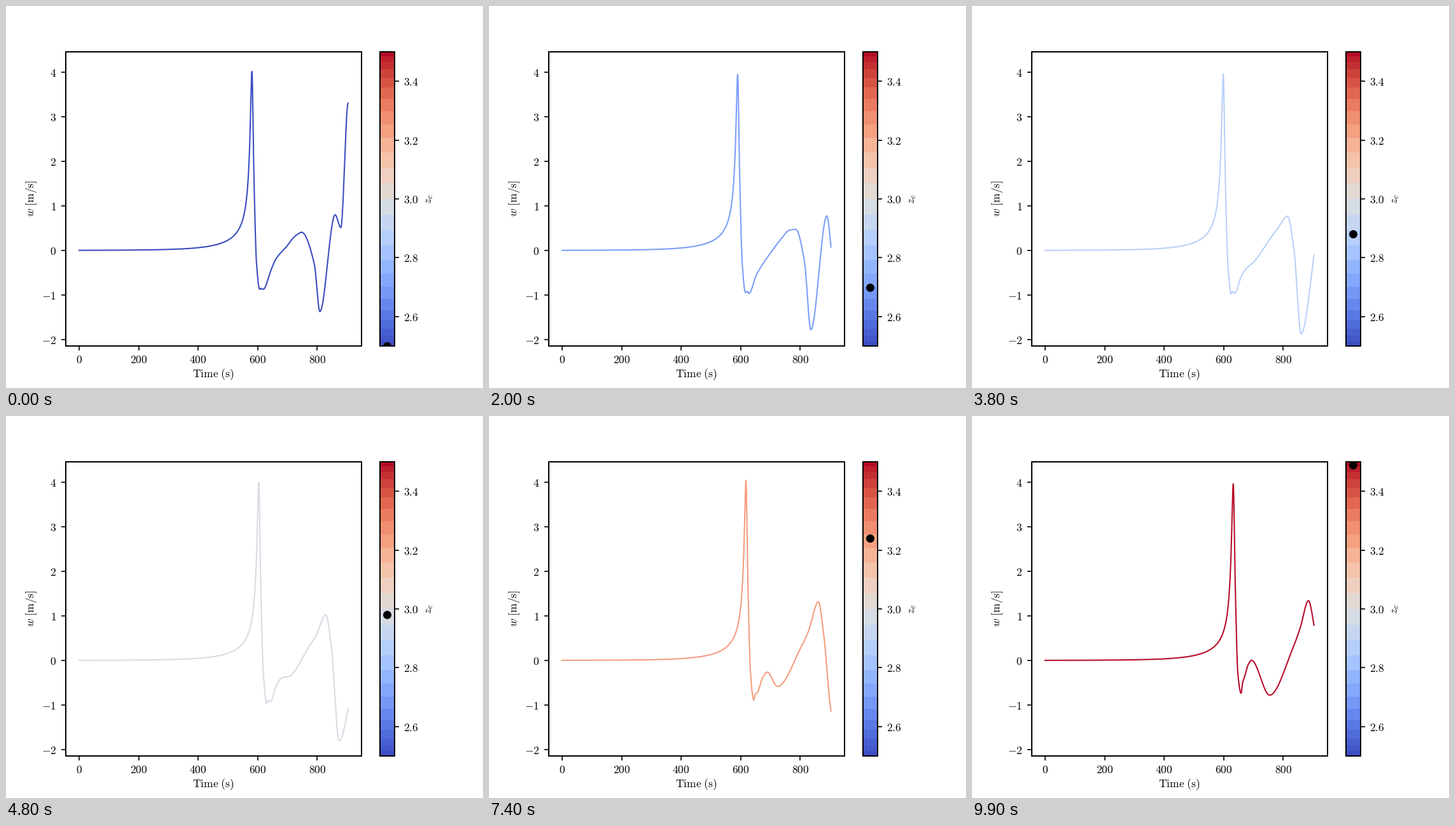
A matplotlib script for the animation above (10000 ms loop, 750 by 600 pixels).

```python
import numpy as np
import matplotlib.pyplot as plt
from matplotlib.animation import FuncAnimation

plt.rcParams["mathtext.fontset"] = "cm"
plt.rcParams["axes.linewidth"] = 0.96
SIZE = 8.4
N = 100
X0, SX = 114.886, 0.46825    # stage px of t = 0, px per second
Y0, SY = 384.0, 70.0         # stage px of w = 0, px per m/s
Z_LO, Z_HI = 2.5, 3.5


def pchip(x, y, q):
    """Shape-preserving cubic through (x, y) with level ends."""
    x, y = np.asarray(x, float), np.asarray(y, float)
    h = np.diff(x)
    s = np.diff(y) / h
    m = np.zeros_like(y)
    w1, w2 = 2 * h[1:] + h[:-1], h[1:] + 2 * h[:-1]
    same = s[:-1] * s[1:] > 0
    a, b = np.where(same, s[:-1], 1), np.where(same, s[1:], 1)
    m[1:-1] = np.where(same, (w1 + w2) / (w1 / a + w2 / b), 0)
    i = np.clip(np.searchsorted(x, q, side="right") - 1, 0, len(h) - 1)
    u = np.clip((q - x[i]) / h[i], 0, 1)
    return (y[i] * (1 + 2 * u) * (1 - u) ** 2 + y[i + 1] * u * u * (3 - 2 * u)
            + h[i] * u * (1 - u) * (m[i] * (1 - u) - m[i + 1] * u))


def turning_points(i):
    """Stage positions of the signal's features, starting at its peak."""
    u = i / (N - 1)

    def go(start, end, bulge=0):
        return start + (end - start) * u + 4 * bulge * u * (1 - u)

    peak = go(386.7, 410.8, -0.9)
    crest = go(464.8, 529, 7)
    crest_y = 290 + 66 / (1 + np.exp((i - 42) / 9))
    rebound = go(517.5, 640, -17)
    return np.array([
        (peak, 104.3 + 3.5 * np.sin(2 * np.pi * (i - 6) / 84)),
        # fall and ringing travel with the peak
        (peak + 3, 262),
        (peak + 7.3, 406),
        (peak + 12.3, go(445, 435.5, 11)),
        (peak + 14.7, go(443.5, 419, 15)),
        (peak + 17.7, go(445, 410, 21)),
        # recovery: shoulder, dip, climb, crest
        (go(417, 434.5), go(414, 390, 20)),
        (go(424, 439.5, 2.5), go(398, 383.7, 20)),
        (go(441, 468, -10), go(378, 438.5, 2)),
        (go(452, 504), go(364, 366, -4)),
        (go(460, 516), go(357.5, 333)),
        (crest, crest_y),
        # plunge and rebound, leaving on the right
        (crest + go(20, 11, -7), crest_y + 50),
        (go(493.5, 556), go(480, 398, 70)),
        (rebound, go(328, 480, -45)),
        (rebound + 9, go(348, 560)),
        (rebound + 20.5, 152),
    ]).T


px = np.arange(X0, 537.7, 0.2)
time = (px - X0) / SX


def signal(i):
    kx, ky = turning_points(i)
    top, growth = (Y0 - ky[0]) / SY, 10.5
    d = np.maximum(kx[0] - px, 0)
    rise = growth / np.hypot(d, growth / top) / (1 + (d / 85) ** 2)
    after = (Y0 - pchip(kx, ky, px)) / SY
    return np.where(px < kx[0], rise, after)


fig = plt.figure(figsize=(5, 4), dpi=150, facecolor="white")
cmap = plt.get_cmap("coolwarm")

ax = fig.add_axes([0.125, 0.11, 0.62, 0.77])
ax.set_xlim((93.75 - X0) / SX, (558.75 - X0) / SX)
ax.set_ylim((Y0 - 534) / SY, (Y0 - 72) / SY)
xt, yt = range(0, 801, 200), range(-2, 5)
ax.set_xticks(xt, [f"${v}$" for v in xt], fontsize=SIZE)
ax.set_yticks(yt, [f"${v}$" for v in yt], fontsize=SIZE)
ax.tick_params(axis="x", pad=2.6)
line, = ax.plot([], [], lw=1.0)

# Colour bands, wider towards the middle of the scale
cax = fig.add_axes([0.78375, 0.11, 0.0308, 0.77])
levels = 3 + 0.5 * np.sin(1.35 * np.linspace(-1, 1, 27)) / np.sin(1.35)
mids = (levels[1:] + levels[:-1]) / 2
cax.pcolormesh([0, 1], levels, mids[:, None], cmap=cmap, vmin=Z_LO, vmax=Z_HI)
cax.set(xlim=(0, 1), ylim=(Z_LO, Z_HI), xticks=[])
cax.yaxis.tick_right()
zt = np.arange(2.6, 3.5, 0.2)
cax.set_yticks(zt, [f"${v:.1f}$" for v in zt], fontsize=SIZE)
dot, = cax.plot([], [], "o", color="black", ms=6.2, mew=0)


def label(x, y, s, rotation=0):
    fig.text(x / 750, 1 - y / 600, s, fontsize=SIZE, rotation=rotation,
             ha="center", va="center")


label(326.2, 578.7, r"$\mathrm{Time\ (s)}$")
label(39.8, 302.5, r"$w\ \mathrm{[m/s]}$", 90)
label(665, 303, r"$z_c$", 90)


def update(i):
    level = i / N
    line.set_data(time, signal(i))
    line.set_color(cmap(level))
    dot.set_data([0.5], [Z_LO + (Z_HI - Z_LO) * level])
    return line, dot


anim = FuncAnimation(fig, update, frames=N, interval=100, repeat=True,
                     repeat_delay=0, init_func=lambda: update(0))
plt.show()
```
